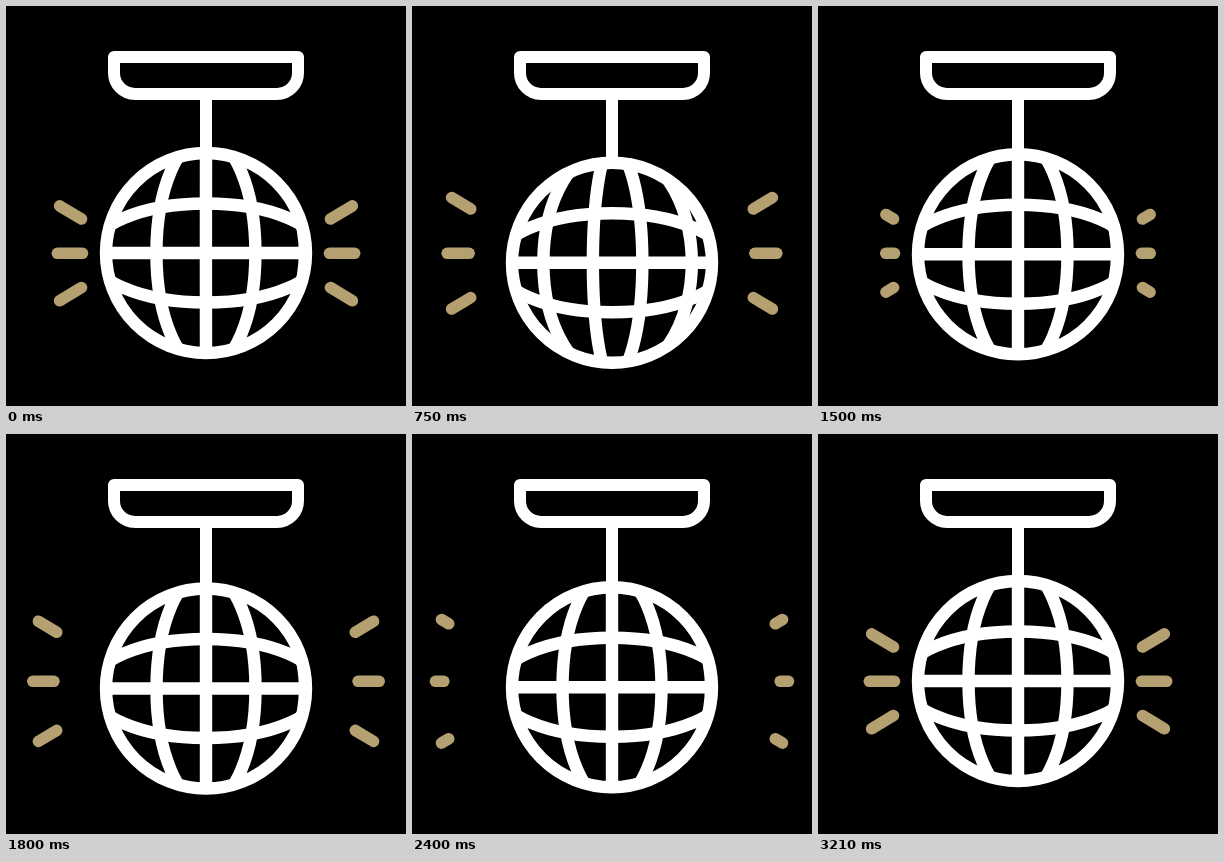
An HTML page with a canvas that plays this animation: 400 by 400 pixels, repeating every 3.24 s.

```html
<!DOCTYPE html>
<html lang="en">
<head>
<meta charset="utf-8">
<title>Mirror ball</title>
<style>
  html, body { margin: 0; height: 100%; overflow: hidden; background: #000; }
  canvas { display: block; }
</style>
</head>
<body>
<canvas id="stage" width="400" height="400"></canvas>
<script>
const ctx = document.getElementById('stage').getContext('2d');
const LOOP = 3240, R = 100, BULGE = 116, GAP = 49.5, STROKE = 12.4;
const WHITE = '#fff', GOLD = '#b5a071';
const plate = new Path2D('M108 51H292V67a21 21 0 0 1-21 21H129a21 21 0 0 1-21-21Z');

const clamp = u => Math.min(1, Math.max(0, u));
const span = (t, a, b) => clamp((t - a) / (b - a));
const easeInOut = u => u * u * (3 - 2 * u);
const easeOut = u => Math.sin(u * Math.PI / 2);

function line(x1, y1, x2, y2) {
  ctx.beginPath();
  ctx.moveTo(x1, y1);
  ctx.lineTo(x2, y2);
  ctx.stroke();
}

// Ball height: two bobs, the last rise slower than the others.
const bobTimes = [0, 680, 1350, 2015, 2945, LOOP];
function ballY(t) {
  if (t >= bobTimes[4]) return 247;
  const i = bobTimes.findIndex((b, n) => t < bobTimes[n + 1]);
  const u = easeInOut(span(t, bobTimes[i], bobTimes[i + 1]));
  return 247 + 10 * (i % 2 ? 1 - u : u);
}

// Visible part [start, end] of each ray: grow, pause, shoot outwards.
const CYCLE = 495, CYCLES = 5, GROWN = 140, GONE = 475, REST = 0.475;
function rayTrim(t) {
  const last = CYCLE * (CYCLES - 1) + GONE;
  if (t >= last) return [0, REST * easeOut(span(t, last, last + 450))];
  let p = t % CYCLE;
  if (p >= GONE) p -= CYCLE;
  if (p < GROWN) {
    const grown = t < GONE ? 1 : easeOut(span(p, GONE - CYCLE, GROWN));
    return [0, REST * grown];
  }
  return [span(p, GROWN - 10, GONE), REST + (1 - REST) * span(p, GROWN, 340)];
}

function drawRays(t) {
  const [start, end] = rayTrim(t);
  if (end - start < 0.01) return;
  ctx.strokeStyle = GOLD;
  ctx.lineCap = 'round';
  ctx.lineWidth = 11.6;
  for (const side of [-1, 1]) {
    for (const row of [-1, 0, 1]) {
      const x = u => 200 + side * (row ? 124.5 + 46 * u : 123.5 + 53 * u);
      const y = u => 247.3 + row * (34.3 + 27.5 * u);
      line(x(start), y(start), x(end), y(end));
    }
  }
}

function drawBall(t) {
  const turn = 2 * GAP * easeInOut(span(t, -20, 1200)) % GAP;
  ctx.save();
  ctx.translate(200, ballY(t));
  ctx.save();
  ctx.beginPath();
  ctx.arc(0, 0, R, 0, 2 * Math.PI);
  ctx.clip();
  ctx.lineWidth = STROKE;
  line(-R, 0, R, 0);
  for (const d of [-GAP, GAP]) {
    ctx.beginPath();
    ctx.ellipse(0, 0, BULGE, GAP, 0, 0, Math.PI, d < 0);
    ctx.stroke();
  }
  for (let k = -1; k <= 2; k++) {
    const d = k * GAP - turn;
    ctx.beginPath();
    ctx.ellipse(0, 0, Math.abs(d), BULGE, 0, -Math.PI / 2, Math.PI / 2, d < 0);
    ctx.stroke();
  }
  ctx.restore();
  ctx.lineWidth = STROKE;
  ctx.beginPath();
  ctx.arc(0, 0, R, 0, 2 * Math.PI);
  ctx.stroke();
  ctx.restore();
}

function draw(t) {
  ctx.fillStyle = '#000';
  ctx.fillRect(0, 0, 400, 400);
  drawRays(t);
  ctx.strokeStyle = WHITE;
  ctx.lineCap = 'butt';
  ctx.lineJoin = 'round';
  ctx.lineWidth = 12;
  line(200, 88, 200, ballY(t) - R);
  ctx.stroke(plate);
  drawBall(t);
}

const begin = performance.now();
function tick() {
  draw((performance.now() - begin) % LOOP);
  requestAnimationFrame(tick);
}
tick();
</script>
</body>
</html>
```
